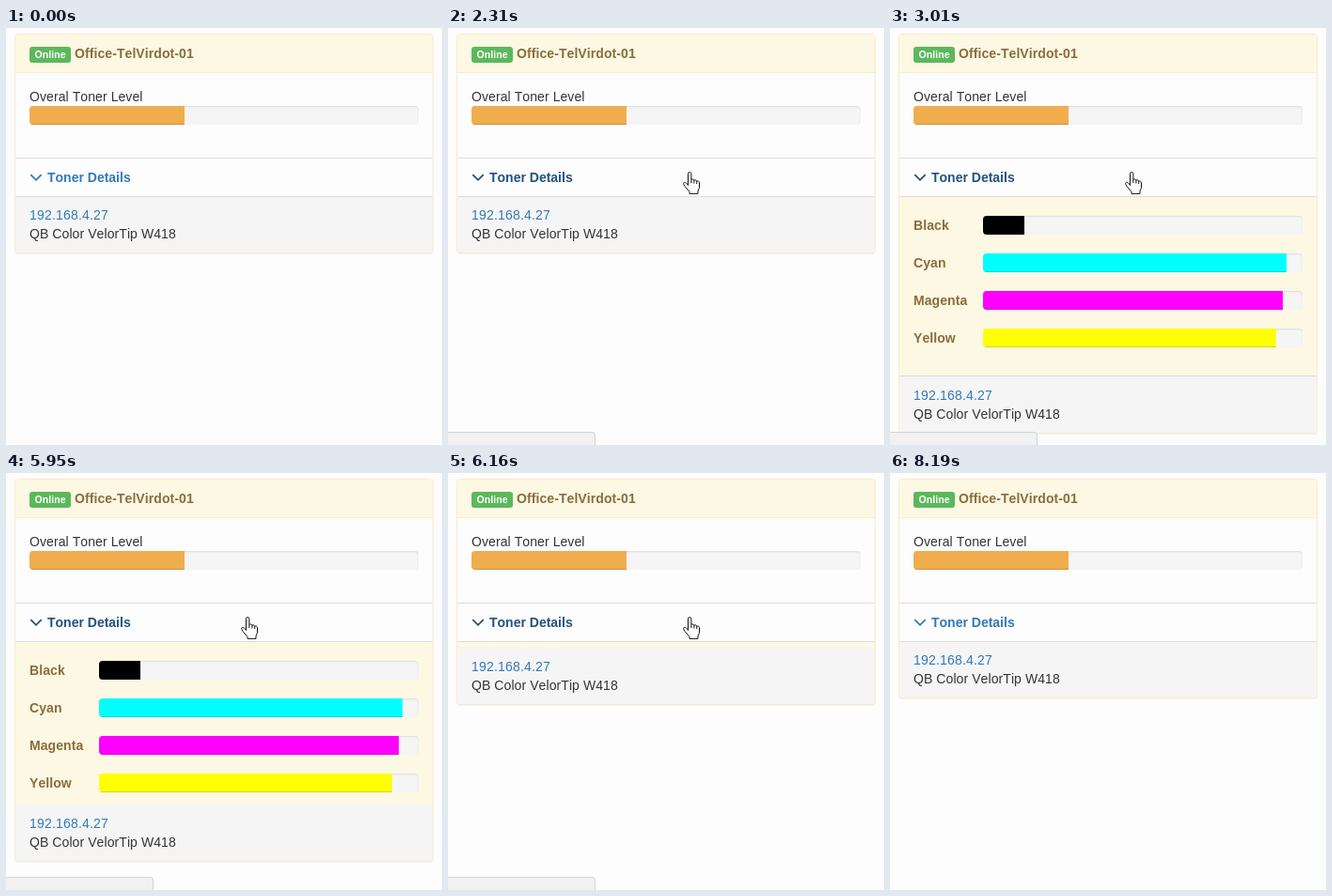
An HTML page for the animation above (8.26 s loop, 464 by 444 pixels).

```html
<!DOCTYPE html>
<html lang="en">
<head>
<meta charset="utf-8">
<title>Toner panel</title>
<style>
html, body { margin: 0; width: 100%; height: 100%; overflow: hidden; background: #fdfdfd; }
body { position: relative; font: 14px/20px "Liberation Sans", Arial, sans-serif; font-kerning: none;
  letter-spacing: .08px; color: #333; cursor: default; }
div, svg { position: absolute; box-sizing: border-box; white-space: nowrap; }
#panel { left: 9px; top: 6px; width: 446px; border: 1px solid #faebcc; border-radius: 4px;
  background: #fdfdfd; box-shadow: 0 1px 1px rgba(0,0,0,.05); overflow: hidden; }
#head { left: 0; top: 0; width: 444px; height: 41px; background: #fcf8e3; border-bottom: 1px solid #faebcc; }
#badge { left: 15px; top: 13px; width: 44px; height: 17px; border-radius: 3px; background: #5cb85c;
  color: #fff; font-weight: bold; font-size: 10.5px; line-height: 16px; text-align: center; }
.strong { font-weight: bold; color: #8a6d3b; }
.rule { left: 0; width: 444px; height: 1px; background: #ddd; }
.track { height: 20px; border-radius: 4px; background: #f5f5f5; overflow: hidden;
  box-shadow: inset 0 1px 2px rgba(0,0,0,.1); }
.fill { left: 0; top: 0; height: 20px; box-shadow: inset 0 -1px 0 rgba(0,0,0,.15); }
#toggle { left: 15px; top: 142px; width: 140px; height: 20px; font-weight: bold; letter-spacing: 0; }
#details { left: 0; top: 173px; width: 444px; background: #fcf8e3; overflow: hidden; }
#foot { left: 0; width: 444px; height: 60px; background: #f5f5f5; }
#address { left: 15px; top: 10px; color: #337ab7; letter-spacing: .19px; }
#status { left: 0; top: 430px; width: 157px; height: 15px; background: #f1f1f1;
  border: 1px solid #d4d4d4; border-left: 0; border-top-right-radius: 4px; }
#pointer { left: 0; top: 0; }
</style>
</head>
<body>
<div id="panel">
  <div id="head">
    <div id="badge">Online</div>
    <div class="strong" style="left:63px;top:10px">Office-TelVirdot-01</div>
  </div>
  <div style="left:15px;top:56px">Overal Toner Level</div>
  <div class="track" style="left:15px;top:76px;width:414px">
    <div class="fill" style="width:165px;background:#f0ad4e"></div>
  </div>
  <div class="rule" style="top:131px"></div>
  <div id="toggle">
    <svg width="16" height="20" fill="none" stroke="currentColor" stroke-width="1.8"><path d="M1.3 7.1 7 12.8 12.7 7.1"/></svg>
    <div style="left:19px;top:0">Toner Details</div>
  </div>
  <div id="details"></div>
  <div id="foot">
    <div id="address">192.168.4.27</div>
    <div style="left:15px;top:30px">QB Color VelorTip W418</div>
  </div>
  <div class="rule" style="top:172px"></div>
</div>
<div id="status"></div>
<svg id="pointer" width="464" height="444" fill="#fff" stroke="#111" stroke-linejoin="round">
  <path id="arrow" d="M.5.7V16.2L4.1 12.8 6.5 18.4 8.9 17.4 6.5 11.9H11.4Z"/>
  <g id="hand">
    <path d="M5.5 14.5V2.3a1.7 1.7 0 0 1 3.4 0V8.6c.6-1 2.8-.8 3 .7.8-.9 2.6-.5 2.8.9 1-.7 2.8 0 2.8 1.6V16c0 2.5-1.5 3.5-1.5 5v2.4H7V21.5L2 15.5C.2 13 .5 11.8 1.6 11.4c1.5-.4 2.6 1.2 3.9 3.1Z"/>
    <path d="M8.9 8.5V12M11.9 9.2V12.5M14.7 10.2V13" fill="none"/>
  </g>
</svg>
<script>
const LOOP = 8260, TICK = 70, OPEN_HEIGHT = 192, BAR_WIDTH = 340;
const $ = id => document.getElementById(id);

const toners = [["Black", 13, "#000"], ["Cyan", 95, "#0ff"], ["Magenta", 94, "#f0f"], ["Yellow", 92, "#ff0"]];
$("details").innerHTML = toners.map(([name, level, color], i) => {
  const top = 20 + i * 40, width = Math.floor(BAR_WIDTH * level / 100);
  return `<div class="strong" style="left:15px;top:${top}px">${name}</div>
    <div class="track" style="left:89px;top:${top}px;width:${BAR_WIDTH}px">
      <div class="fill" style="width:${width}px;background:${color}"></div>
    </div>`;
}).join("") + '<div class="rule" style="top:190px"></div>';

// Each stop holds until the next: time, shape, x, y
const stops = [
  [0, ""],
  [1260, "arrow", 448, 251], [1330, "arrow", 401, 284], [1400, "arrow", 327, 287],
  [1470, "arrow", 299, 280], [1540, "arrow", 267, 261], [1610, "arrow", 258, 233],
  [1680, "arrow", 256, 199], [1750, "hand", 253, 153], [1820, "hand", 253, 145],
  [2240, "hand", 251, 149], [2310, "hand", 250, 153],
  [6720, "arrow", 245, 190], [6790, "arrow", 302, 240], [6860, "arrow", 371, 277],
  [6930, ""]
];

// CSS "ease": cubic-bezier(.25, .1, .25, 1)
function ease(p) {
  if (p <= 0) return 0;
  if (p >= 1) return 1;
  const bezier = (a, b, u) => 3 * a * u * (1 - u) ** 2 + 3 * b * u * u * (1 - u) + u ** 3;
  let lo = 0, hi = 1;
  for (let i = 0; i < 20; i++) {
    const mid = (lo + hi) / 2;
    if (bezier(.25, .25, mid) < p) lo = mid; else hi = mid;
  }
  return bezier(.1, 1, lo);
}

function openHeight(t) {
  if (t < 2730 || t >= 6230) return 0;
  const opened = ease((t - 2648) / 320), closed = ease((t - 5918) / 318);
  return Math.round(OPEN_HEIGHT * (opened - closed));
}

const show = (el, on) => el.style.display = on ? "" : "none";

function render(time) {
  const t = Math.floor(time % LOOP / TICK) * TICK;
  const height = openHeight(t);
  $("details").style.height = Math.max(0, height - 1) + "px";
  $("foot").style.top = 172 + height + "px";
  $("panel").style.height = 234 + height + "px";
  $("toggle").style.color = t >= 1750 && t < 8190 ? "#23527c" : "#337ab7";
  show($("status"), t >= 1960 && t < 7070);

  const [, shape, x, y] = stops.findLast(stop => stop[0] <= t);
  for (const id of ["arrow", "hand"]) {
    show($(id), id === shape);
    if (id === shape) $(id).setAttribute("transform", `translate(${x} ${y})`);
  }
}

const start = performance.now();
function frame() {
  render(performance.now() - start);
  requestAnimationFrame(frame);
}
frame();
</script>
</body>
</html>
```
